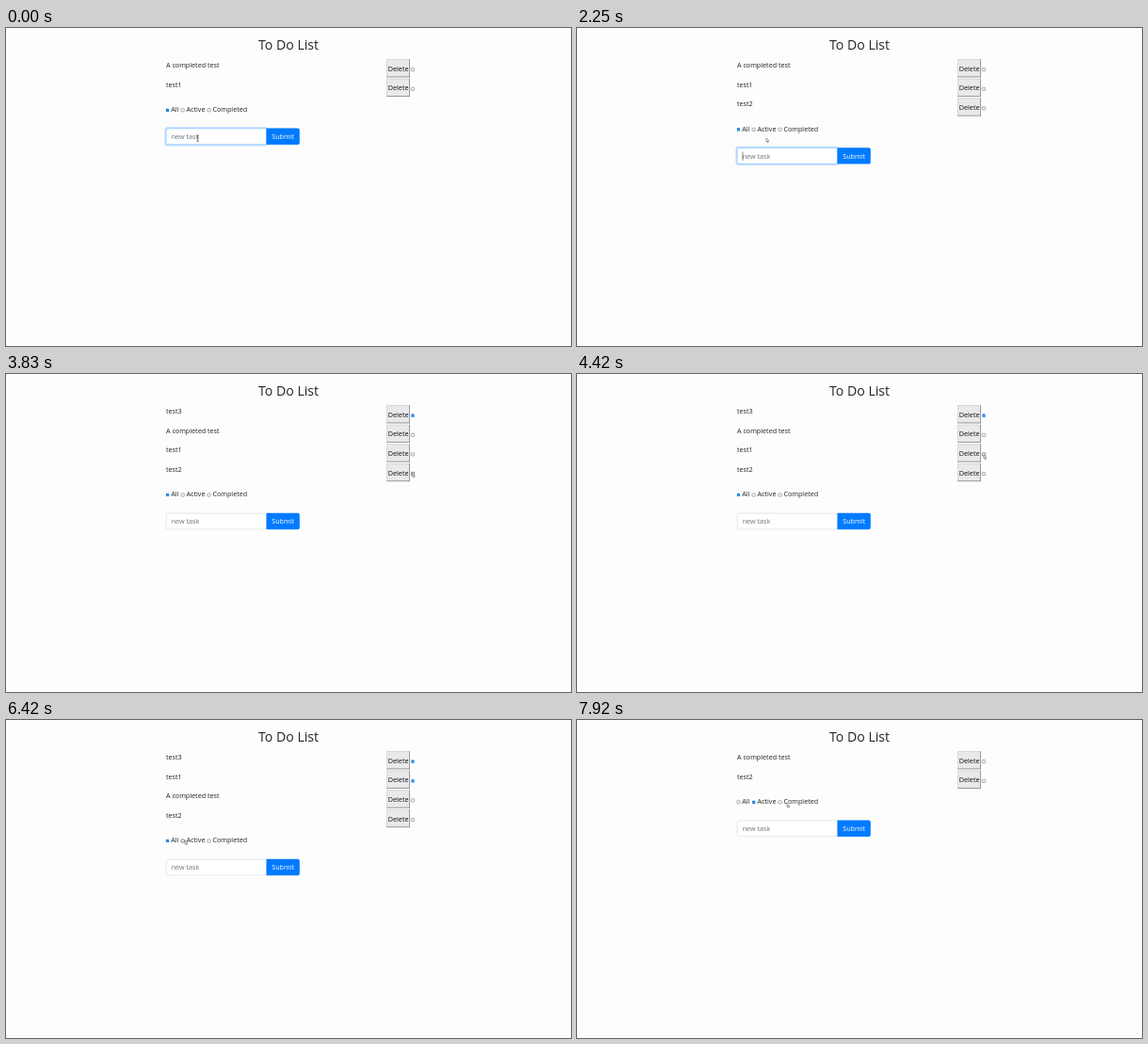
Write an HTML page with a canvas that moves like this. It is 600x338 px and loops after 8 s.

```html
<!DOCTYPE html>
<html lang="en">
<head>
<meta charset="utf-8">
<title>To Do List</title>
<style>
  html, body { margin: 0; width: 100%; height: 100%; overflow: hidden; background: #fdfdfd; }
  canvas { display: block; width: 600px; height: 338px; }
</style>
</head>
<body>
<canvas id="stage"></canvas>
<script>
const W = 600, H = 338, LOOP = 8000, TICK = 1000 / 12;
const ROW = 20.6, LEFT = 170;
const INK = '#212529', BLUE = '#007bff';
const FONT = '"Open Sans", "Noto Sans", sans-serif';

const canvas = document.getElementById('stage');
const ctx = canvas.getContext('2d');
const ratio = window.devicePixelRatio || 1;
canvas.width = W * ratio;
canvas.height = H * ratio;

// Each list holds [start time, value]; the latest started entry applies.
const lists = [
  [0, ['A completed test', 'test1']],
  [1080, ['A completed test', 'test1', 'test2']],
  [2330, ['A completed test', 'test1', 'test2', 'test3']],
  [3830, ['test3', 'A completed test', 'test1', 'test2']],
  [4750, ['test3', 'test1', 'A completed test', 'test2']],
  [6500, ['A completed test', 'test2']]
];
const typed = [
  [0, ''], [330, 't'], [420, 'te'], [500, 'tes'], [580, 'test'], [750, 'test2'], [1000, ''],
  [1330, 't'], [1420, 'te'], [1500, 'tes'], [1580, 'test'], [1830, 'test3'], [2250, '']
];
const carets = [[0, false], [330, true], [2330, false], [2500, true], [3750, false]];
const pointers = [[0, 'beam'], [330, 'none'], [1000, 'arrow']];
const doneAt = { test3: 3750, test1: 4670 };
const BLUR = 3750, FILTER = 6500;

// Pointer tip: time, x, y
const path = [
  [0, 201, 117], [2840, 201, 117], [3000, 330, 112], [3170, 439, 108.5], [3250, 435.5, 108.5],
  [3670, 431.5, 105.5], [3830, 431.5, 105.5], [4170, 432, 91], [4250, 432, 91],
  [4420, 432, 86], [4830, 432, 86], [5080, 424, 79], [5500, 194, 127.5],
  [5590, 194, 127.5], [5830, 189, 127.5], [6080, 189, 127.5], [6250, 190, 128],
  [6750, 190, 128], [7000, 216, 42], [7170, 305, 50], [7500, 223, 88.5], [LOOP, 223, 88.5]
];

function at(list, t) {
  let value = list[0][1];
  for (const [start, v] of list) if (t >= start - 4) value = v;
  return value;
}

function tipAt(t) {
  const i = path.findIndex(p => p[0] > t);
  const [t0, x0, y0] = path[i - 1], [t1, x1, y1] = path[i];
  const k = (t - t0) / (t1 - t0);
  return { x: x0 + (x1 - x0) * k, y: y0 + (y1 - y0) * k };
}

function text(str, x, y, color = INK, size = 7.2, align = 'left') {
  ctx.font = `${size}px ${FONT}`;
  ctx.textAlign = align;
  ctx.fillStyle = color;
  ctx.fillText(str, x, y);
}

function rect(x, y, w, h, color) {
  ctx.fillStyle = color;
  ctx.fillRect(x, y, w, h);
}

function roundBox(x, y, w, h, radii) {
  ctx.beginPath();
  ctx.roundRect(x, y, w, h, radii);
}

function checkbox(x, y, checked, tip) {
  const hover = tip && Math.abs(tip.x - x) < 5 && Math.abs(tip.y - y) < 4;
  roundBox(x - 1.6, y - 1.6, 3.2, 3.2, 0.5);
  ctx.lineWidth = checked ? 0.9 : 0.6;
  if (checked) {
    ctx.fillStyle = hover ? '#005cc8' : '#0075e8';
    ctx.fill();
    ctx.beginPath();
    ctx.moveTo(x - 1, y);
    ctx.lineTo(x - 0.2, y + 0.8);
    ctx.lineTo(x + 1.1, y - 0.8);
    ctx.strokeStyle = '#fff';
    ctx.lineWidth = 0.5;
  } else {
    ctx.fillStyle = '#fff';
    ctx.fill();
    ctx.strokeStyle = hover ? '#383838' : '#767676';
  }
  ctx.stroke();
}

function deleteButton(y) {
  const x = 404.2, w = 24.8, h = 19.2;
  rect(x, y, w, h, '#e9e9ec');
  rect(x, y, w, 0.8, '#d2d2d4');
  rect(x, y, 0.8, h, '#d2d2d4');
  rect(x, y + h - 0.9, w, 0.9, '#909092');
  rect(x + w - 0.9, y, 0.9, h, '#909092');
  text('Delete', x + w / 2, y + 12.6, '#111', 7.2, 'center');
}

function drawRows(items, t, tip) {
  items.forEach((name, i) => {
    const dy = i * ROW;
    text(name, LEFT, 41.9 + dy);
    deleteButton(33.2 + dy);
    checkbox(432, 44.2 + dy, t >= doneAt[name] - 4, tip);
  });
}

function drawFilters(dy, active, tip) {
  [['All', 171.5], ['Active', 187.7], ['Completed', 215.6]].forEach(([label, x], i) => {
    checkbox(x, 87.3 + dy, i === active, tip);
    text(label, x + 3.8, 89.1 + dy);
  });
}

function drawForm(dy, t) {
  const y = 106.7 + dy, w = 106.6, h = 17.2, focused = t < BLUR - 4;
  if (focused) {
    roundBox(LEFT - 1.5, y - 1.5, w + 3, h + 3, 3);
    ctx.fillStyle = '#bfdeff';
    ctx.fill();
  }
  roundBox(LEFT + 0.2, y + 0.2, w - 0.4, h - 0.4, [1.9, 0, 0, 1.9]);
  ctx.fillStyle = '#fff';
  ctx.fill();
  ctx.strokeStyle = focused ? '#80bdff' : '#ced4da';
  ctx.lineWidth = 0.55;
  ctx.stroke();

  const str = at(typed, t), base = 118.1 + dy;
  text(str || 'new task', 175.7, base, str ? '#495057' : '#6c757d');
  if (at(carets, t)) {
    const end = str ? ctx.measureText(str).width : 0;
    rect(175.7 + end, y + 4.3, 0.6, 9.3, '#333');
  }

  roundBox(276.5, y - 0.1, 35.3, h + 0.2, [0.6, 1.9, 1.9, 0.6]);
  ctx.fillStyle = BLUE;
  ctx.fill();
  text('Submit', 294.1, base, '#fff', 7.2, 'center');
}

function drawPointer(kind, { x, y }) {
  ctx.beginPath();
  if (kind === 'beam') {
    ctx.moveTo(x + 1.4, y - 2.8);
    ctx.lineTo(x + 3.8, y - 2.8);
    ctx.moveTo(x + 2.6, y - 2.8);
    ctx.lineTo(x + 2.6, y + 3.6);
    ctx.moveTo(x + 1.4, y + 3.6);
    ctx.lineTo(x + 3.8, y + 3.6);
    ctx.strokeStyle = '#555';
    ctx.lineWidth = 0.7;
    ctx.stroke();
  } else if (kind === 'arrow') {
    ctx.moveTo(x, y);
    for (const [dx, dy] of [[0, 4], [0.9, 3.3], [1.6, 4.8], [2.2, 4.5], [1.6, 3], [2.8, 2.9]]) {
      ctx.lineTo(x + dx, y + dy);
    }
    ctx.closePath();
    ctx.fillStyle = '#fff';
    ctx.fill();
    ctx.strokeStyle = '#444';
    ctx.lineWidth = 0.5;
    ctx.stroke();
  }
}

function draw(t) {
  const items = at(lists, t), kind = at(pointers, t);
  const tip = tipAt(Math.floor((t + 4) / TICK) * TICK);
  const hoverTip = kind === 'arrow' ? tip : null;
  const dy = (items.length - 2) * ROW;

  ctx.setTransform(ratio, 0, 0, ratio, 0, 0);
  rect(0, 0, W, H, '#fdfdfd');
  text('To Do List', W / 2, 22.8, INK, 14.1, 'center');
  drawRows(items, t, hoverTip);
  drawFilters(dy, t >= FILTER - 4 ? 1 : 0, hoverTip);
  drawForm(dy, t);
  drawPointer(kind, tip);
}

const begin = performance.now();
function frame() {
  draw((performance.now() - begin) % LOOP);
  requestAnimationFrame(frame);
}
frame();
</script>
</body>
</html>
```
